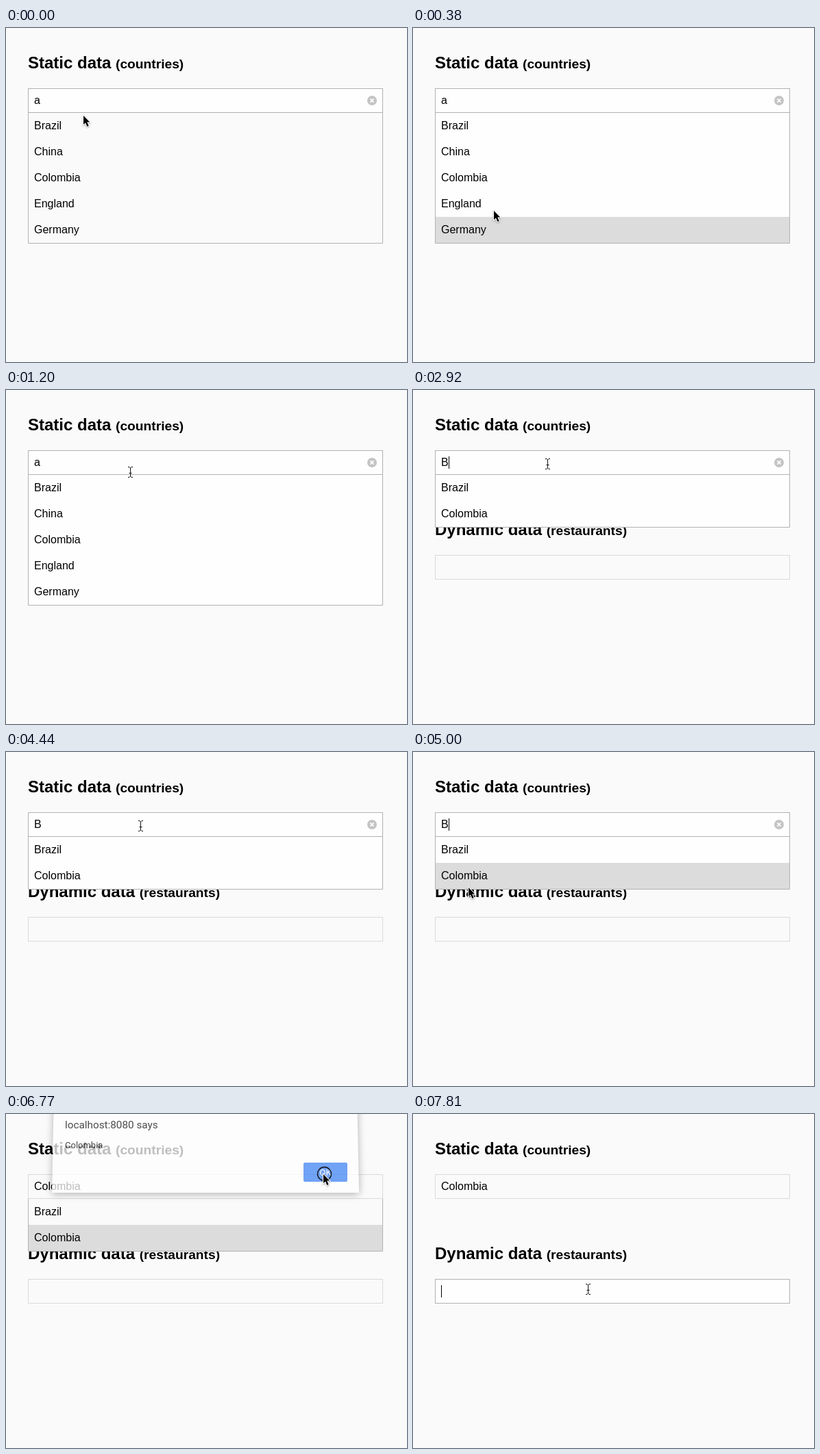
Animation, 585 px wide and 488 px high, one loop 8 s. Source, as an HTML page:

```html
<!DOCTYPE html>
<html lang="en">
<head>
<meta charset="utf-8">
<title>Autocomplete demo</title>
<style>
  html, body { margin: 0; height: 100%; overflow: hidden; background: #fafafa; }
  svg { display: block; font: 16px "Liberation Sans", Arial, sans-serif; }
  .head { font-size: 24px; font-weight: 700; }
  .small { font-size: 19.2px; }
  .field { stroke: #dadada; fill: #fafafa; }
  .focus { stroke: #b2b2b2; fill: #fefefe; }
  #panel { stroke: #b2b2b2; }
  #dialog { font-family: Roboto, sans-serif; font-size: 13px; fill: #111; }
  #sheet { fill: #fff; filter: drop-shadow(0 2px 6px #0006); }
  #arrow { stroke: #fff; stroke-width: 2; paint-order: stroke; filter: drop-shadow(0 1px 1px #0005); }
  #beam { fill: none; stroke: #111; }
</style>
</head>
<body>
<svg width="585" height="488" viewBox="0 0 585 488">
  <text class="head" x="32" y="59">Static data <tspan class="small">(countries)</tspan></text>
  <text class="head" x="32" y="212">Dynamic data <tspan class="small">(restaurants)</tspan></text>
  <rect id="first" x="32.5" y="88.5" width="517" height="35"/>
  <rect id="second" x="32.5" y="241.5" width="517" height="35"/>
  <text id="value" x="41" y="111"></text>
  <g id="clear">
    <circle cx="534" cy="106" r="7" fill="#c4c4c4"/>
    <path d="M531.4 103.4l5.2 5.2m0-5.2l-5.2 5.2" stroke="#fff" stroke-width="1.6"/>
  </g>
  <g id="list">
    <path id="panel"/>
    <rect id="mark" x="33" width="516" height="38" fill="#dcdcdc"/>
    <g id="items"></g>
  </g>
  <rect id="caret" width="1" height="18"/>
  <g id="dialog">
    <path id="sheet"/>
    <text x="86" y="21" font-size="15.3">localhost:8080 says</text>
    <text x="86" y="50">Colombia</text>
    <rect x="434" y="71" width="64" height="28" rx="2" fill="#4285f4"/>
    <text x="466" y="90" fill="#fff" text-anchor="middle">OK</text>
  </g>
  <g id="pointer">
    <circle id="ring" cx="1.5" cy="-.5" r="10" fill="none" stroke="#111" stroke-width="1.3"/>
    <path id="arrow" d="M0 0V13L3 10.4L5.4 16L7.7 15L5.3 9.4H9.2Z"/>
    <path id="beam" d="M-3 -7.5H-1L.5 -6L2 -7.5H4M.5 -6V6M-3 7.5H-1L.5 6L2 7.5H4M-1.5 1.5H2.5"/>
  </g>
</svg>
<script>
const LOOP = 8000;
const COUNTRIES = ["Brazil", "China", "Colombia", "England", "Germany"];
const ROW = 38, LIST_TOP = 124;
const ERASE = 2470, TYPE = 2860, MATCH = 2920, PICK = 5540, CONFIRM = 6710, CLOSE = 6910, FOCUS = 7780;
const BLINK = 505, BLINK_STARTS = [1365, ERASE, 2910, FOCUS];

// Pointer moves: start, end, x, y; it rests in between
const START = [113, 127];
const MOVES = [
  [0, 280, 118, 298], [280, 380, 118, 267], [380, 810, 150, 150],
  [870, 1200, 181, 120], [1200, 1390, 196, 108],
  [4920, 5000, 81, 198], [5170, 5390, 100, 189],
  [5920, 6040, 120, 214], [6040, 6520, 463, 88],
  [7120, 7200, 452, 96], [7200, 7540, 255, 256]
];

const $ = id => document.getElementById(id);
const show = (id, on) => $(id).style.display = on ? "" : "none";
const set = (id, attrs) => { for (const k in attrs) $(id).setAttribute(k, attrs[k]); };
const within = (t, a, b) => t >= a && t < b;
const progress = (t, a, b) => Math.max(0, Math.min(1, (t - a) / (b - a)));

function pointerAt(t) {
  let [x, y] = START;
  for (const [a, b, toX, toY] of MOVES) {
    const k = progress(t, a, b);
    x += (toX - x) * k;
    y += (toY - y) * k;
  }
  return [Math.round(x), Math.round(y)];
}

function drawList(t, blocked) {
  const open = t < ERASE || within(t, MATCH, CLOSE);
  show("list", open);
  if (!open) return;

  const names = t < ERASE ? COUNTRIES : COUNTRIES.filter(n => /b/i.test(n));
  $("items").innerHTML = names.map((n, i) => `<text x="41" y="${148 + ROW * i}">${n}</text>`).join("");

  // The highlight trails the pointer slightly
  const lag = 30, settled = t >= lag;
  const row = blocked ? 1 : Math.floor((pointerAt(t - lag)[1] - LIST_TOP) / ROW);
  show("mark", settled && names[row]);
  set("mark", { y: LIST_TOP + ROW * row });
  set("panel", {
    d: `M32.5 ${LIST_TOP}v${ROW * names.length + .5}h517V${LIST_TOP}`,
    fill: settled && !blocked ? "#fefefe" : "#fafafa"
  });
}

function drawDialog(t, blocked) {
  show("dialog", blocked);
  const gone = t < CONFIRM ? 1 - progress(t, PICK - 40, PICK + 200) : progress(t, CONFIRM, CONFIRM + 240);
  set("dialog", { opacity: 1 - gone, transform: `translate(0 ${2.5 - 10 * gone})` });
  set("sheet", { d: `M${68 + 7 * gone} -20H${514 - 7 * gone}L515 115H67Z` });
}

function drawCaret(t, text) {
  const since = t - BLINK_STARTS.findLast(s => s <= t);
  const typing = t < PICK;
  show("caret", (typing || t >= FOCUS) && Math.floor(since / BLINK) % 2 === 0);
  set("caret", {
    x: typing ? 41 + Math.round($("value").getComputedTextLength()) : 41,
    y: typing ? 97 : 250
  });
}

function draw(t) {
  const [x, y] = pointerAt(t);
  const blocked = within(t, PICK, CLOSE);
  const overFirst = !blocked && within(y, 88, 124);
  const beam = overFirst || t > CLOSE && within(y, 241, 277);
  const text = t < ERASE ? "a" : t < TYPE ? "" : t < PICK ? "B" : "Colombia";

  $("value").textContent = text;
  set("first", { class: t < PICK ? "focus" : "field" });
  set("second", { class: t < FOCUS ? "field" : "focus" });
  show("clear", t < PICK ? text : overFirst);
  drawList(t, blocked);
  drawDialog(t, blocked);
  drawCaret(t, text);

  show("beam", beam);
  show("arrow", !beam);
  show("ring", [PICK, CONFIRM].some(c => within(t, c, c + 120)));
  set("pointer", { transform: `translate(${x} ${y})` });
}

function tick() {
  draw(performance.now() % LOOP);
  requestAnimationFrame(tick);
}
tick();
</script>
</body>
</html>
```
